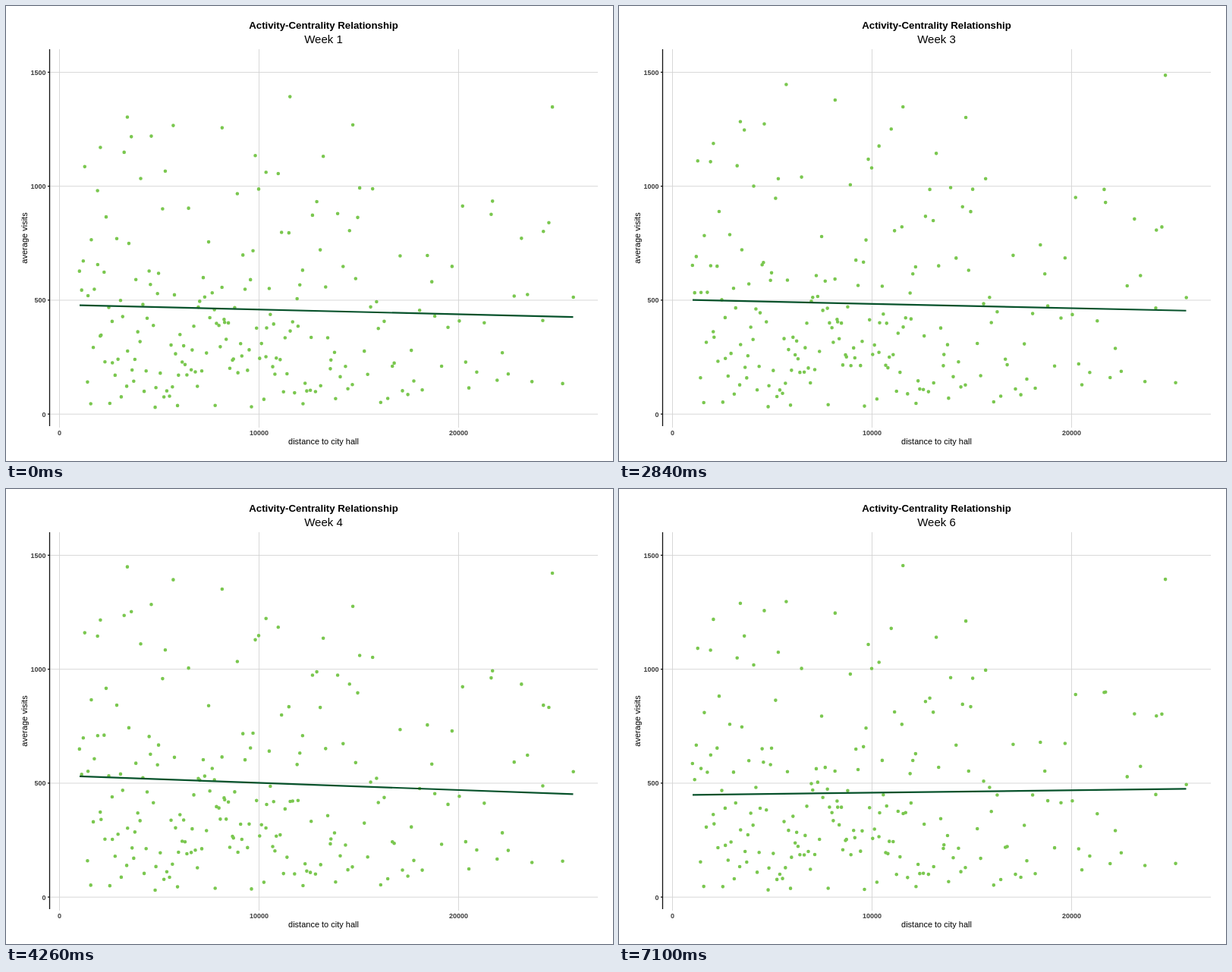
Write an HTML page that moves like this. It is 800 by 600 pixels and loops after 8 s.

```html
<!DOCTYPE html>
<html lang="en">
<head>
<meta charset="utf-8">
<title>Activity and centrality by week</title>
<style>
  html, body { margin: 0; width: 100%; height: 100%; overflow: hidden; background: #fff; }
  svg { display: block; width: 800px; height: 600px; font-family: "Liberation Sans", Arial, sans-serif; }
  text { text-anchor: middle; }
  .tick { font-size: 9px; font-weight: bold; fill: #3d3d3d; }
  .left text { text-anchor: end; }
</style>
</head>
<body>
<svg viewBox="0 0 800 600">
  <text x="418.5" y="30" font-size="13.25" font-weight="bold">Activity-Centrality Relationship</text>
  <text id="week" x="418.5" y="49" font-size="15"></text>
  <path id="grid" stroke="#d4d4d4" stroke-width=".9"/>
  <path id="dots" fill="none" stroke="#7ac74f" stroke-width="4.6" stroke-linecap="round"/>
  <path id="trend" stroke="#07522b" stroke-width="2.2"/>
  <path id="axis" stroke="#111" stroke-width="1.3"/>
  <g id="xTicks" class="tick"></g>
  <g id="yTicks" class="tick left"></g>
  <text x="418.5" y="578" font-size="11">distance to city hall</text>
  <text transform="translate(28 306) rotate(-90)" font-size="11">average visits</text>
</svg>
<script>
const LOOP = 8000, WEEK = 1420;
const DOTS = 200, MAX_VISITS = 1525, MEAN_VISITS = 476;
const el = id => document.getElementById(id);
const xAt = thousands => +(70.5 + 26.3 * thousands).toFixed(2);
const yAt = visits => +(538.2 - 0.3005 * visits).toFixed(2);

// Visits at the left and right end of each week's trend line.
const trends = [[478, 426], [546, 426], [501, 454], [530, 452], [500, 470], [449, 475]];

// Places that stand out every week: distance in thousands, visits.
const outliers = [
  [2.05, 1190], [3.4, 1330], [3.6, 1220], [4.6, 1260], [5.7, 1375],
  [8.15, 1355], [10.35, 1125], [11.55, 1425], [14.7, 1310], [20.2, 930],
  [21.7, 937], [23.15, 855], [24.25, 852], [24.7, 1440], [25.75, 530]
];

function seeded(seed) {
  return () => (seed = (seed * 16807) % 2147483647) / 2147483647;
}
const random = seeded(2024);

// Even spread near the centre, thinning out far away; visits are skewed to low values.
function randomPlace(_, i) {
  const u = (i + random()) / DOTS;
  const skewed = (-Math.log(0.05 + 0.95 * random())) ** 0.8;
  return [1 + 16.5 * u + 7.8 * u ** 10, 25 + 490 * skewed];
}
const places = [...outliers, ...Array.from({ length: DOTS }, randomPlace)];

const plots = trends.map(([left, right]) => {
  const level = (left + right) / 2 / MEAN_VISITS;
  return places.map(([distance, mean]) => {
    const visits = mean * level * (0.94 + 0.12 * random());
    return visits > MAX_VISITS ? "" : `M${xAt(distance)} ${yAt(visits)}h0`;
  }).join("");
});

function label(group, x, y, value) {
  const text = document.createElementNS("http://www.w3.org/2000/svg", "text");
  text.setAttribute("x", x);
  text.setAttribute("y", y);
  text.textContent = value;
  el(group).append(text);
}

let grid = "", axis = "M57.5 57V554";
for (let visits = 0; visits <= 1500; visits += 500) {
  const y = yAt(visits);
  grid += `M57 ${y}H780`;
  axis += `M55 ${y}H58`;
  label("yTicks", 52.5, y + 3.3, visits);
}
for (let thousands = 0; thousands <= 20; thousands += 10) {
  const x = xAt(thousands);
  grid += `M${x} 57V556`;
  label("xTicks", x, 566, thousands * 1000);
}
el("grid").setAttribute("d", grid);
el("axis").setAttribute("d", axis);

let shown = -1;
function draw() {
  const week = Math.floor(performance.now() % LOOP / WEEK);
  if (week !== shown) {
    const [left, right] = trends[week];
    el("week").textContent = `Week ${week + 1}`;
    el("dots").setAttribute("d", plots[week]);
    el("trend").setAttribute("d", `M97 ${yAt(left)}L747.5 ${yAt(right)}`);
    shown = week;
  }
  requestAnimationFrame(draw);
}
draw();
</script>
</body>
</html>
```
